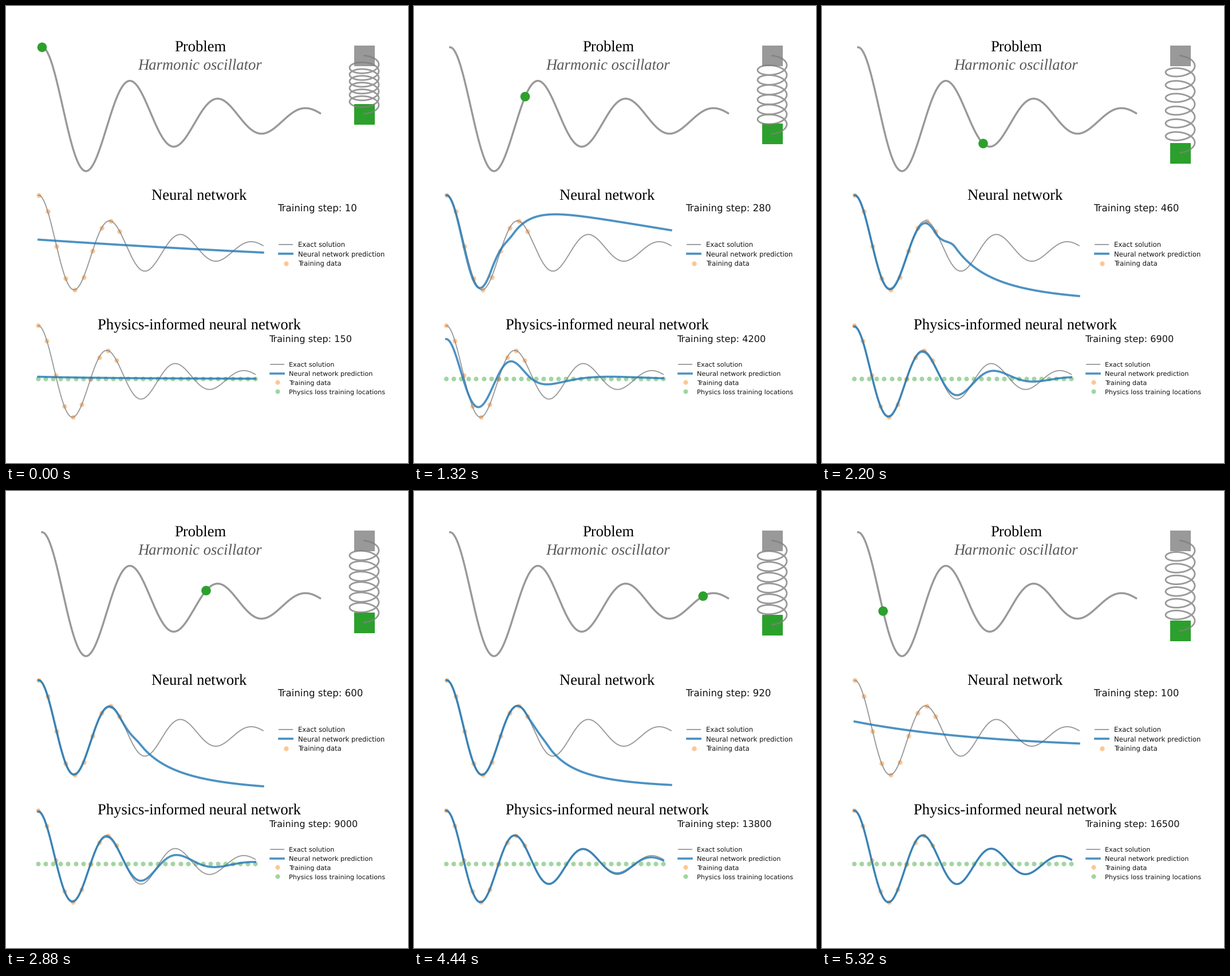
A matplotlib script for the animation above (5.4 s loop, 702x797 px).

```python
import numpy as np
import matplotlib.pyplot as plt
from matplotlib.animation import FuncAnimation
from matplotlib.patches import Circle, Rectangle

plt.rcParams["text.hinting"] = "none"

W, H, DPI = 702, 797, 64
PT = 72 / DPI  # points per pixel
BLUE, ORANGE, GREEN = "tab:blue", "tab:orange", "tab:green"
GRAY = "#999999"

fig = plt.figure(figsize=(W / DPI, H / DPI), dpi=DPI, facecolor="white")
ax = fig.add_axes([0, 0, 1, 1])
ax.set(xlim=(0, W), ylim=(H, 0))
ax.axis("off")

t = np.linspace(0, 1, 500)
DECAY, W0 = 2, 20
OMEGA = np.sqrt(W0**2 - DECAY**2)
PHI = np.arctan(-DECAY / OMEGA)


def exact(s):
    """Underdamped oscillator released at 1 with no speed."""
    return np.exp(-DECAY * s) * np.cos(PHI + OMEGA * s) / np.cos(PHI)


def smooth(a, b):
    s = np.clip((t - a) / (b - a), 0, 1)
    return s * s * (3 - 2 * s)


def fitted(tail, a, b, fade=0, speed=1):
    """Follow the exact curve, then leave it for the tail between a and b."""
    m = smooth(a, b)
    return (1 - m) * (1 - fade * t**2) * exact(speed * t) + m * tail


def falling(floor, p, q):
    """Tail that sinks towards a floor."""
    return floor + 1 / np.maximum(p + q * (t - .5), .1)**2


def damped(gain, reach, lead=0, lag=0):
    """Exact curve that fades out past reach and slows down late."""
    g = .1 + (gain - .1) / (1 + (t / reach)**5)
    late = np.maximum(t - .36, 0)**1.6
    return g * exact(t + lead * np.tanh(10 * t) - lag * late)


def blend(stages, i):
    """Mix the two training stages around step i."""
    keys = sorted(stages)
    i = min(i, keys[-1])
    b = max(1, int(np.searchsorted(keys, i)))
    k0, k1 = keys[b - 1], keys[b]
    f = (i - k0) / (k1 - k0)
    return (1 - f) * stages[k0] + f * stages[k1]


# Shape of each prediction at a few moments of its training
NN = {
    0: .188 - .276 * t + .04 * t**2,
    9: -.258 + .503 * np.exp(-1.6 * t),
    13: -.11 + .402 * np.exp(-5.2 * t) + .23 * t,
    27: fitted(1.035 - .675 * t - .41 * np.exp(-12 * (t - .32)),
               .2, .3, fade=2, speed=1.05),
    45: fitted(falling(-1.01, 1.11, 2.68), .36, .45, fade=.8),
    59: fitted(falling(-1.08, 1.19, 2.95), .36, .45, fade=.3),
    91: fitted(falling(-1, 1.32, 4.2), .36, .45),
}
PINN = {
    0: .04 * np.exp(-2.5 * t) - .006,
    13: .05 - .16 * t + .12 * t**2,
    27: damped(.745, .395, lead=.01, lag=.62),
    45: damped(.98, .633, lag=.15),
    59: damped(.98, .66, lag=.11),
    91: damped(1, 1.19),
    109: damped(1, 1.6),
}


def label(x, y, s, size, color="#111111", font="DejaVu Sans", **kw):
    return ax.text(x, y, s, fontsize=size * PT, color=color, family=font,
                   va="baseline", zorder=3, **kw)


def title(x, y, s, color="k", **kw):
    label(x, y, s, 26.67, color, "Liberation Serif", **kw)


def stroke(x, y, color, width):
    return ax.plot(x, y, color=color, lw=width * PT, alpha=.8)[0]


class Panel:
    """Exact curve, training points, prediction and legend."""

    def __init__(self, x0, width, zero, scale, step_at, key_at, pitch, size,
                 physics=False):
        self.x0, self.width, self.zero, self.scale = x0, width, zero, scale
        self.k = width / 563.6
        self.draw(exact(t), "grey", 2.7)
        if physics:
            s = np.linspace(0, 1, 30)
            self.dots(self.x(s), self.y(0 * s), GREEN)
        s = t[0:200:20]
        self.dots(self.x(s), self.y(exact(s)), ORANGE)
        self.line = self.draw(0 * t, BLUE, 5.4)
        self.step = label(*step_at, "", 24 * self.k)
        self.legend(*key_at, pitch, size, physics)

    def x(self, s):
        return self.x0 + self.width * s

    def y(self, v):
        return self.zero - self.scale * v

    def draw(self, v, color, width):
        return stroke(self.x(t), self.y(v), color, width * self.k)

    def dots(self, x, y, color):
        ax.scatter(x, y, s=(12 * self.k * PT)**2, color=color, alpha=.44,
                   lw=0, zorder=1)

    def legend(self, x, y, pitch, size, physics):
        rows = [("Exact solution", "grey", 2.7),
                ("Neural network prediction", BLUE, 5.4),
                ("Training data", ORANGE, 0)]
        if physics:
            rows.append(("Physics loss training locations", GREEN, 0))
        for name, color, width in rows:
            if width:
                stroke([x, x + 2 * size], [y, y], color, width * self.k)
            else:
                self.dots([x + size], [y], color)
            label(x + 2.8 * size, y + 4, name, size)
            y += pitch

    def update(self, values, step):
        self.line.set_ydata(self.y(values))
        self.step.set_text(f"Training step: {step}")


title(294, 79.5, "Problem")
title(230, 111.3, "Harmonic oscillator", "#595959", style="italic")
title(254, 338.3, "Neural network")
title(159.8, 563, "Physics-informed neural network")

# Oscillator: trace, ball, and mass on a spring
X0, SPAN, ZERO, AMP = 63, 485.5, 196.9, 124.9
stroke(X0 + SPAN * t, ZERO - AMP * exact(t), "grey", 3.4)
ball = ax.add_patch(Circle((X0, 72), 8.3, color="#2ca02c", lw=0, zorder=3))
SIDE, TOP, LOOP = 36, 86.5, 12.4
ax.add_patch(Rectangle((608, 69), SIDE, SIDE, color=GRAY, lw=0))
mass = ax.add_patch(Rectangle((608, 170), SIDE, SIDE, color="#2ca02c", lw=0))
turn = np.linspace(0, 13 * np.pi, 700)
spring = stroke(625.5 + 25.5 * np.sin(turn), 0 * turn, "grey", 2.8)

plain = Panel(57, 391.8, 425.4, 95.4, (474, 358.7), (477, 416), 16.4, 11.65)
physics = Panel(56.2, 379, 649.7, 92.4, (459.2, 585.2), (462.2, 624.6),
                15.9, 11.3, physics=True)


def update(n):
    i = n * 41 // 50  # the picture holds now and then
    j = i % 100

    s = j / 100
    y = ZERO - AMP * exact(s)
    ball.center = X0 + SPAN * s, y
    low = 188 + .406 * (y - 72)
    mass.set_y(low - 17.5)
    drop = low - TOP - 2 * LOOP
    spring.set_ydata(TOP + drop * turn / turn[-1] + LOOP * (1 - np.cos(turn)))

    plain.update(blend(NN, j), 10 * (j + 1))
    physics.update(blend(PINN, i), 150 * (i + 1))
    return ball, mass, spring


anim = FuncAnimation(fig, update, frames=135, interval=40, repeat=True,
                     repeat_delay=0, blit=False)
plt.show()
```
